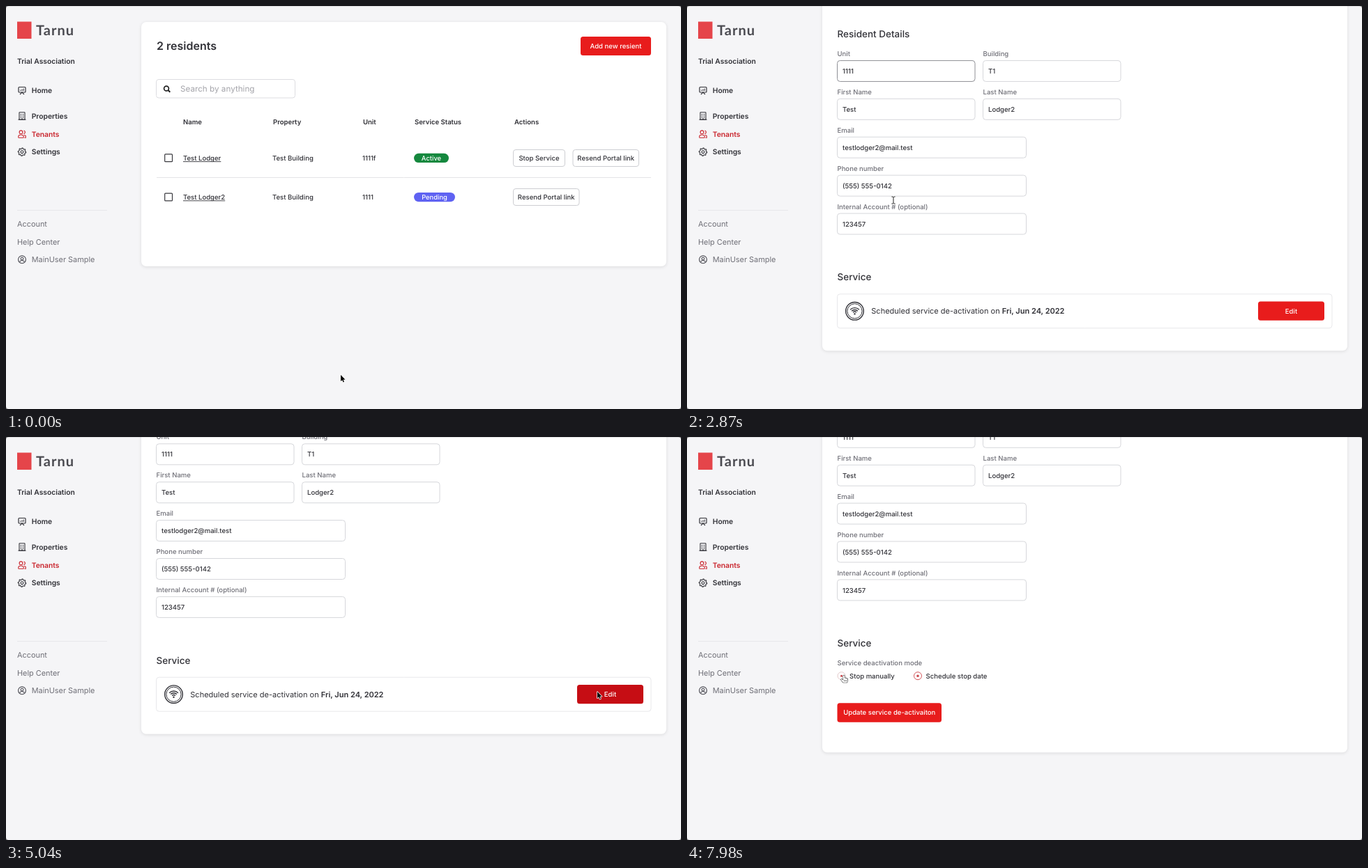
An HTML page with a canvas that plays this animation: 968 by 579 pixels, repeating every 8 s.

```html
<!DOCTYPE html>
<html lang="en">
<head>
<meta charset="utf-8">
<title>Resident service</title>
<style>
html, body { margin: 0; width: 100%; height: 100%; overflow: hidden; background: #f5f5f7; }
canvas { display: block; width: 968px; height: 579px; }
</style>
</head>
<body>
<canvas id="stage"></canvas>
<script>
const W = 968, H = 579, LOOP = 8000, STEP = 70;
const canvas = document.getElementById('stage');
const c = canvas.getContext('2d');
const ratio = window.devicePixelRatio || 1;
canvas.width = W * ratio;
canvas.height = H * ratio;

const INK = '#313137', GREY = '#6f6f77', RED = '#e81c1c', ACCENT = '#c9252d', LINE = '#d6d7db';
const OPEN_AT = 1820, PRESS_AT = 5040, EDIT_AT = 5110, MANUAL_AT = 7910;

const eases = {
  lin: p => p,
  in: p => p * p,
  out: p => 1 - (1 - p) ** 2,
  both: p => p * p * (3 - 2 * p)
};

// keys: [time, [values], ease towards this key]
function track(keys, t) {
  const i = keys.findIndex(k => k[0] > t);
  if (i === 0) return keys[0][1];
  if (i < 0) return keys[keys.length - 1][1];
  const [t0, a] = keys[i - 1], [t1, b, ease = 'lin'] = keys[i];
  const p = eases[ease]((t - t0) / (t1 - t0));
  return a.map((v, n) => v + (b[n] - v) * p);
}

const pointerKeys = [
  [0, [480, 530]], [350, [582, 497], 'both'], [420, [582, 497]],
  [1260, [298.5, 278], 'both'], [1330, [296, 279]], [3360, [296, 279]],
  [4130, [656, 358], 'in'], [4760, [848, 366], 'out'], [5600, [848, 366]],
  [5950, [671, 419], 'both'], [7000, [671, 419]],
  [7420, [320, 333], 'in'], [7700, [225, 342], 'out']
];

const scrollKeys = [
  [2380, [0]], [2450, [6]], [2520, [22]], [2590, [47]], [2800, [128]], [3010, [190]],
  [3220, [218.1]], [3290, [218.1]], [3360, [217.3]], [5040, [217.3]], [5110, [163.5]],
  [6020, [163.5]], [6090, [164.6]], [6160, [173]], [6230, [191]], [6300, [213]],
  [6370, [230]], [6440, [239]], [6510, [242.6]], [6720, [242.6]], [6790, [241.8]]
];

const clamp = v => Math.max(0, Math.min(1, v));

function mix(a, b, p) {
  return `rgb(${a.map((v, i) => Math.round(v + (b[i] - v) * p)).join()})`;
}

// y is the middle of the capital letters
function text(str, x, y, { size = 9.55, weight = 500, color = INK, align = 'left', font = 'Inter', gap = 0 } = {}) {
  c.font = `${weight} ${size}px ${font}, sans-serif`;
  c.textRendering = 'geometricPrecision';
  c.letterSpacing = gap + 'px';
  c.textAlign = align;
  c.fillStyle = color;
  c.fillText(str, x, y + size * 0.364);
  return c.measureText(str).width;
}

function box(x, y, w, h, r, fill, stroke, width = 1) {
  c.beginPath();
  c.roundRect(x, y, w, h, r);
  if (fill) { c.fillStyle = fill; c.fill(); }
  if (stroke) { c.strokeStyle = stroke; c.lineWidth = width; c.stroke(); }
}

function ring(x, y, r, color, width = 1, from = 0, to = Math.PI * 2) {
  c.beginPath();
  c.arc(x, y, r, from, to);
  c.strokeStyle = color;
  c.lineWidth = width;
  c.stroke();
}

function dot(x, y, r, color) {
  c.beginPath();
  c.arc(x, y, r, 0, Math.PI * 2);
  c.fillStyle = color;
  c.fill();
}

function line(color, width, ...points) {
  c.beginPath();
  points.forEach(([x, y], i) => i ? c.lineTo(x, y) : c.moveTo(x, y));
  c.strokeStyle = color;
  c.lineWidth = width;
  c.stroke();
}

function card(bottom) {
  c.save();
  c.shadowColor = 'rgba(0,0,0,.11)';
  c.shadowBlur = 5 * ratio;
  c.shadowOffsetY = ratio;
  box(194, 23, 753, bottom - 23, 7, '#fff');
  c.restore();
}

function button(label, x, y, w, h, fill = RED) {
  const solid = fill !== '#fff';
  box(x, y, w, h, 3.5, fill, solid ? null : '#cdced2');
  text(label, x + w / 2, y + h / 2, { color: solid ? '#fff' : INK, align: 'center' });
}

const icons = {
  board(x, y, col) {
    box(x - 5, y - 5, 10, 7.5, 1, null, col, 1.2);
    line(col, 1.1, [x - 3, y + 5.5], [x, y + 2.5], [x + 3, y + 5.5]);
    line(col, 1, [x - 2.2, y + .5], [x - 2.2, y - 1]);
    line(col, 1, [x, y + .5], [x, y - 2]);
    line(col, 1, [x + 2.2, y + .5], [x + 2.2, y - 3]);
  },
  building(x, y, col) {
    box(x - 4, y - 5.2, 8, 10.4, .5, null, col, 1.1);
    line(col, 1.1, [x - 5.5, y + 5.2], [x + 5.5, y + 5.2]);
    for (const dy of [-3, -.7, 1.6])
      for (const dx of [-2.2, .8]) { c.fillStyle = col; c.fillRect(x + dx, y + dy, 1.4, 1.2); }
    line(col, 1.2, [x, y + 3.2], [x, y + 5]);
  },
  people(x, y, col) {
    ring(x - 1.5, y - 2.7, 2.4, col, 1.1);
    ring(x + 2.2, y - 2.7, 2.2, col, 1.1, -1.4, 1.5);
    box(x - 5.2, y + 1.2, 7.4, 4, [2.5, 2.5, .5, .5], null, col, 1.1);
    line(col, 1.1, [x + 3, y + 1.2], [x + 5.2, y + 2.5], [x + 5.2, y + 5.2], [x + 3.5, y + 5.2]);
  },
  gear(x, y, col) {
    c.beginPath();
    for (let i = 0; i < 32; i++) {
      const a = i * Math.PI / 16, r = i % 4 < 2 ? 5.7 : 4.5;
      c.lineTo(x + r * Math.cos(a), y + r * Math.sin(a));
    }
    c.closePath();
    c.strokeStyle = col;
    c.lineWidth = 1.1;
    c.stroke();
    ring(x, y, 1.9, col, 1.1);
  },
  person(x, y, col) {
    ring(x, y, 5.4, col, 1.1);
    ring(x, y - 1.2, 1.9, col, 1.1);
    ring(x, y + 5, 3.7, col, 1.1, Math.PI * 1.15, Math.PI * 1.85);
  },
  wifi(x, y, col) {
    ring(x, y, 12.8, col, 1.4);
    ring(x, y, 10.6, col, 1);
    for (const r of [3.4, 6.2, 9]) ring(x, y + 4.3, r, col, 1.4, Math.PI * 1.25, Math.PI * 1.75);
    dot(x, y + 4, 1.2, col);
  }
};

function sidebar(dy) {
  c.save();
  c.translate(0, dy);
  c.fillStyle = '#e5454a';
  c.fillRect(16, 22.5, 20.5, 24.5);
  text('Tarnu', 43, 35, { size: 20, weight: 700, color: '#4a4a50', font: 'Lato', gap: 1 });
  text('Trial Association', 16, 79.5, { size: 10.3, weight: 600 });
  [['Home', 121.5, 'board'], ['Properties', 158, 'building'],
   ['Tenants', 184, 'people'], ['Settings', 209.7, 'gear']].forEach(([label, y, icon]) => {
    const color = label === 'Tenants' ? ACCENT : INK;
    icons[icon](23, y, color);
    text(label, 36.7, y, { size: 10.3, weight: 600, color });
  });
  line('#e7e7ea', 1, [16, 293.5], [145, 293.5]);
  const quiet = { size: 10.9, weight: 400, color: GREY };
  text('Account', 16, 313, quiet);
  text('Help Center', 16, 338.7, quiet);
  icons.person(23, 364.3, '#4a4a52');
  text('MainUser Sample', 36.7, 364.3, quiet);
  c.restore();
}

function listPage(t) {
  card(374);
  text('2 residents', 216, 57.5, { size: 16, weight: 600 });
  button('Add new resient', 824, 44, 101, 27);

  box(215.5, 105.5, 199, 26.5, 3.5, '#fff', '#dddde1');
  ring(230, 118.5, 3.4, '#222', 1.7);
  line('#222', 2, [232.5, 121], [235.3, 123.8]);
  text('Search by anything', 250, 119, { size: 11.7, weight: 400, color: '#a4a4aa' });

  [['Name', 254], ['Property', 383], ['Unit', 512], ['Service Status', 586], ['Actions', 729]]
    .forEach(([label, x]) => text(label, x, 166.5, { weight: 600 }));

  const row = (name, unit, y, status, statusW, fill, color) => {
    box(227.7, y - 5.4, 10.8, 10.8, 1, '#fff', '#3a3a3f', 1.2);
    const w = text(name, 254, y, { color });
    line(color, .9, [254, y + 5.3], [254 + w, y + 5.3]);
    text('Test Building', 382, y);
    text(unit, 511, y);
    box(585, y - 6.6, statusW, 13.4, 6.7, fill);
    text(status, 585 + statusW / 2, y, { size: 9.4, color: '#fff', align: 'center' });
  };
  const hover = clamp((t - 1260) / 210);
  row('Test Lodger', '1111f', 218.3, 'Active', 50, '#15883e', INK);
  row('Test Lodger2', '1111', 274.5, 'Pending', 59, '#5f62f2', mix([49, 49, 55], [92, 92, 205], hover));
  button('Stop Service', 727.5, 206.5, 74, 24, '#fff');
  button('Resend Portal link', 813, 206.5, 94.5, 24, '#fff');
  line('#e4e4e7', 1, [216, 246.5], [925, 246.5]);
  button('Resend Portal link', 727.5, 262.5, 94.5, 24, '#fff');
}

function field(label, value, x, y, w, focused) {
  text(label, x, y, { color: GREY });
  box(x, y + 9.8, w, 30, 4, '#fff', focused ? '#8e8f95' : LINE);
  text(value, x + 7.5, y + 25);
}

function radio(label, x, dotSize, color) {
  ring(x, 585, 5.5, color);
  if (dotSize) dot(x, 585, dotSize, '#c9444a');
  text(label, x + 11.6, 585);
}

function detailPage(t, scroll, pointerX) {
  const editing = t >= EDIT_AT, manual = t >= MANUAL_AT;
  c.save();
  c.translate(0, -scroll);
  card(manual ? 695 : editing ? 669 : 644);
  text('Test Lodger2', 216, 57.5, { size: 16 });

  text('Property', 215.5, 101.3, { color: GREY });
  box(215.5, 111.3, 271, 30, 4, '#dee2e6', '#ced3d8');
  text('Test Building', 220, 126.3, { color: '#7b828a' });
  line('#a3a9b0', .9, [479, 126], [481, 127.6], [483, 126]);

  const heading = { size: 13.5 };
  text('Resident Details', 215.5, 189, heading);
  field('Unit', '1111', 215.5, 217.3, 197.5, t < PRESS_AT);
  field('Building', 'T1', 424.5, 217.3, 197.5);
  field('First Name', 'Test', 215.5, 272.2, 197.5);
  field('Last Name', 'Lodger2', 424.5, 272.2, 197.5);
  field('Email', 'testlodger2@mail.test', 215.5, 327.1, 271);
  field('Phone number', '(555) 555-0142', 215.5, 382, 271);
  field('Internal Account # (optional)', '123457', 215.5, 436.9, 271);
  text('Service', 215.5, 538, heading);

  if (!editing) {
    box(215.5, 562.5, 709.5, 49, 4, '#fff', '#e8e8eb');
    icons.wifi(240.5, 587, INK);
    const w = text('Scheduled service de-activation on ', 264.3, 587, { size: 11, weight: 400 });
    text('Fri, Jun 24, 2022', 264.3 + w, 587, { size: 11, weight: 600 });
    button('Edit', 819, 573.2, 95, 27.3, t > 4000 && pointerX >= 819 ? '#c60d14' : RED);
  } else {
    text('Service deactivation mode', 215.5, 566.4, { color: GREY });
    const turn = manual ? (t - MANUAL_AT + STEP) / 140 : 0;
    radio('Stop manually', 221.5, 1.5 * turn, manual ? '#e3c9cb' : '#d3d3d7');
    radio('Schedule stop date', manual ? 331 : 365.5, 3.2 - 1.5 * turn, '#d4575c');
    if (manual) {
      button('Update service de-activaiton', 215.5, 624, 149.5, 27.5);
    } else {
      text('Scheduled stop date', 232.5, 607, { color: GREY });
      box(232.7, 616.9, 270.6, 30.4, 2, '#fff', '#bdbec2');
      text('6/24/2022', 236, 632.3);
    }
  }
  c.restore();
}

const shapes = {
  arrow: new Path2D('M0 0V9.2L2.1 7.3L3.5 10.6L5 10L3.6 6.8H6.5Z'),
  hand: new Path2D('M-.9 1Q0 -.6 .9 1V4.2L2.4 4.4L4.2 4.9Q5.6 5.2 5.4 6.8L4.5 10.8H-1.2L-3.8 7.2Q-4.6 5.8 -3.2 5.8L-.9 7.4Z')
};

function pointer(kind, x, y) {
  c.save();
  c.translate(x, y);
  c.lineJoin = 'round';
  if (kind === 'beam') {
    for (const [color, w] of [['#fff', 2.4], ['#222', 1]]) {
      line(color, w, [-2.6, -5], [-.8, -5], [0, -4.2], [.8, -5], [2.6, -5]);
      line(color, w, [0, -4.2], [0, 4.2]);
      line(color, w, [-2.6, 5], [-.8, 5], [0, 4.2], [.8, 5], [2.6, 5]);
    }
  } else {
    const hand = kind === 'hand';
    c.lineWidth = hand ? 1.1 : 1.5;
    c.strokeStyle = hand ? '#222' : '#fff';
    c.stroke(shapes[kind]);
    c.fillStyle = hand ? '#fff' : '#000';
    c.fill(shapes[kind]);
    if (hand) for (const dx of [.4, 2, 3.4]) line('#444', .6, [dx, 7], [dx, 9.2]);
  }
  c.restore();
}

function pointerKind(t) {
  if (t >= 1330 && t < OPEN_AT || t >= 7700) return 'hand';
  return t >= OPEN_AT && t < 3360 ? 'beam' : 'arrow';
}

function windowEdge() {
  c.fillStyle = 'rgba(0,0,0,.1)';
  c.fillRect(0, 0, W, 1);
  c.beginPath();
  c.rect(0, 0, W, H);
  c.roundRect(0, 0, W, H, 4);
  c.fillStyle = 'rgba(0,0,0,.5)';
  c.fill('evenodd');
}

function draw(now) {
  const t = Math.floor(now % LOOP / STEP) * STEP;
  const [x, y] = track(pointerKeys, t);
  const [scroll] = track(scrollKeys, t);
  const limit = t < EDIT_AT ? 217.3 : 241.8;
  c.setTransform(ratio, 0, 0, ratio, 0, 0);
  c.fillStyle = '#f5f5f7';
  c.fillRect(0, 0, W, H);
  sidebar(-Math.max(0, scroll - limit));
  if (t < OPEN_AT) listPage(t);
  else detailPage(t, scroll, x);
  pointer(pointerKind(t), x, y);
  windowEdge();
}

const start = performance.now();
function tick() {
  draw(performance.now() - start);
  requestAnimationFrame(tick);
}
tick();
</script>
</body>
</html>
```
